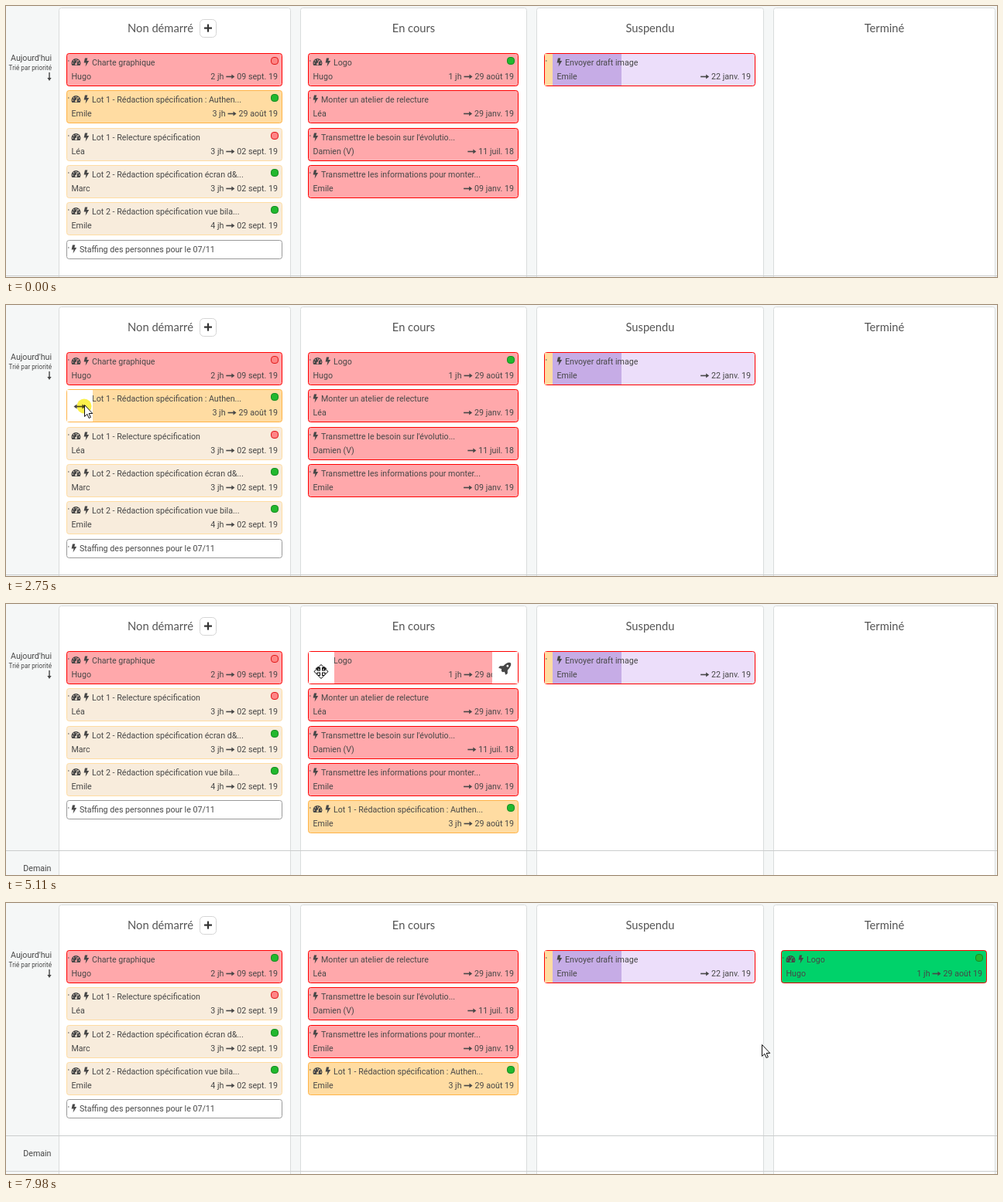
Write an HTML page with a canvas that moves like this. It is 1280 px wide and 351 px high and loops after 8000 ms.

```html
<!DOCTYPE html>
<html lang="fr">
<head>
<meta charset="utf-8">
<title>Kanban</title>
<style>
html, body { margin: 0; width: 100%; height: 100%; overflow: hidden; background: #f5f7f7; }
canvas { display: block; }
</style>
</head>
<body>
<canvas id="stage" width="1280" height="351"></canvas>
<script>
const ctx = document.getElementById('stage').getContext('2d');
const LOOP = 8000, INK = '#474747', BODY = '10.67px Roboto, sans-serif';

const column = (title, x, end) => ({ title, x, end, left: x + 10, right: end - 11, mid: (x + end) / 2 });
const columns = [
  column('Non démarré', 68, 368),
  column('En cours', 380, 673),
  column('Suspendu', 685, 979),
  column('Terminé', 991, 1278)
];
columns[0].mid -= 18.5; // room for the add button

const kinds = {
  red: ['#ffa8ab', '#f00'],
  orange: ['#ffdca2', '#ffb347'],
  beige: ['#f8ecdc', '#ffdca2'],
  white: ['#fff', '#999'],
  purple: ['#ecdefa', '#f00'],
  green: ['#00d26a', '#f00']
};

const card = (kind, title, who, load, date, dot) => ({ kind, title, who, load, date, dot });
const chart = card('red', 'Charte graphique', 'Hugo', '2 jh', '09 sept. 19', 'red');
const chartOk = { ...chart, dot: 'green' };
const spec = card('orange', 'Lot 1 - Rédaction spécification : Authen...', 'Emile', '3 jh', '29 août 19', 'green');
const logo = card('red', 'Logo', 'Hugo', '1 jh', '29 août 19', 'green');
const logoDone = { ...logo, kind: 'green' };
const draft = card('purple', 'Envoyer draft image', 'Emile', '', '22 janv. 19');
const todo = [
  card('beige', 'Lot 1 - Relecture spécification', 'Léa', '3 jh', '02 sept. 19', 'red'),
  card('beige', 'Lot 2 - Rédaction spécification écran d&...', 'Marc', '3 jh', '02 sept. 19', 'green'),
  card('beige', 'Lot 2 - Rédaction spécification vue bila...', 'Emile', '4 jh', '02 sept. 19', 'green'),
  card('white', 'Staffing des personnes pour le 07/11')
];
const doing = [
  card('red', 'Monter un atelier de relecture', 'Léa', '', '29 janv. 19'),
  card('red', "Transmettre le besoin sur l'évolutio...", 'Damien (V)', '', '11 juil. 18'),
  card('red', 'Transmettre les informations pour monter...', 'Emile', '', '09 janv. 19')
];

const phases = [
  { from: 0, line: 349, cols: [[chart, spec, ...todo], [logo, ...doing], [draft], []] },
  { from: 4010, line: 319, cols: [[chart, ...todo], [logo, ...doing, spec], [draft], []] },
  { from: 7610, line: 301, cols: [[chartOk, ...todo], [...doing, spec], [draft], [logoDone]] }
];

const drags = [
  { item: spec, col: 0, row: 1, hover: 2160, press: 2700, start: 2780, release: 3860, drop: 3890, settle: 4010, rest: 4740 },
  { item: logo, col: 1, row: 0, hover: 5110, press: 5940, start: 5940, release: 7490, drop: 7490, settle: 7610, rest: 7640 }
];

// pointer stops: arrival time, x, y, and departure time where it rests
const stops = [
  [500, 970, 346], [1180, 377, 181], [1290, 306, 155], [2110, 101, 130, 2770], [2960, 142, 134],
  [3510, 446, 114, 4660], [4890, 407, 87, 6250], [6930, 977, 83], [7130, 1032, 82, 7510], [7960, 976, 184, LOOP]
].map(([at, x, y, rest]) => ({ at, x, y, rest, leave: rest || at }));

const within = (v, a, b) => v >= a && v < b;
const cardTop = row => Math.round(60.8 + 48.4 * row);

function speed(i, k) {
  const a = stops[i - 1], c = stops[i + 1];
  return !a || !c || stops[i].rest ? 0 : (c[k] - a[k]) / (c.at - a.leave);
}

function pointer(t) {
  const i = Math.max(0, stops.findLastIndex(s => s.at <= t));
  const a = stops[i], b = stops[i + 1];
  if (t <= a.leave || !b) return a;
  const d = b.at - a.leave, u = (t - a.leave) / d, v = 1 - u;
  const at = k => Math.round(v * v * (1 + 2 * u) * a[k] + u * u * (3 - 2 * u) * b[k]
    + d * u * v * (v * speed(i, k) - u * speed(i + 1, k)));
  return { x: at('x'), y: at('y') };
}

function text(str, x, y, align = 'left', font = BODY, color = INK) {
  ctx.font = font;
  ctx.textAlign = align;
  ctx.fillStyle = color;
  ctx.fillText(str, x, y);
}

function rect(x, y, w, h, fill) {
  ctx.fillStyle = fill;
  ctx.fillRect(x, y, w, h);
}

function paint(fill, stroke) {
  if (fill) { ctx.fillStyle = fill; ctx.fill(); }
  if (stroke) { ctx.lineWidth = 1; ctx.strokeStyle = stroke; ctx.stroke(); }
}

function box(x, y, w, h, r, fill, stroke) {
  ctx.beginPath();
  ctx.roundRect(x + .5, y + .5, w - 1, h - 1, r);
  paint(fill, stroke);
}

function poly(x, y, pts, fill, stroke) {
  ctx.beginPath();
  pts.forEach((v, i) => i % 2 || ctx.lineTo(x + v, y + pts[i + 1]));
  ctx.closePath();
  paint(fill, stroke);
}

function disc(x, y, r, fill) {
  ctx.beginPath();
  ctx.arc(x, y, r, 0, 7);
  paint(fill);
}

function bolt(x, y) {
  poly(x, y, [2, 0, 5.3, 0, 4.3, 3.4, 7.2, 3.4, 2.6, 11, 3.4, 6, .6, 6], INK);
}

function gauge(x, y, back) {
  ctx.beginPath();
  ctx.arc(x, y, 6, Math.PI * .83, Math.PI * 2.17);
  paint(INK);
  for (let i = 0; i < 5; i++) {
    const a = Math.PI * (1 + i / 4);
    disc(x + 4.2 * Math.cos(a), y + 4.2 * Math.sin(a), .75, back);
  }
  ctx.beginPath();
  ctx.moveTo(x, y + 1);
  ctx.lineTo(x + 2, y - 3.8);
  paint(null, back);
  disc(x, y + 1.2, 1.3, back);
}

// horizontal arrow from x to tip, pointing either way
function arrow(x, y, tip) {
  const dir = Math.sign(tip - x);
  poly(tip, y, [0, 0, -4 * dir, -3, -4 * dir, 3], INK);
  ctx.fillRect(x, y - .8, tip - x - 3 * dir, 1.6);
}

function rocket(x, y) {
  ctx.save();
  ctx.translate(x, y);
  ctx.rotate(Math.PI / 4);
  ctx.beginPath();
  ctx.ellipse(0, -1.5, 3.8, 8, 0, 0, 7);
  paint(INK);
  poly(0, 0, [0, -4, 7, 3, 6.5, 6, 0, 3, -6.5, 6, -7, 3], INK);
  disc(0, -4, 1.4, '#fff');
  ctx.restore();
}

function drawCard(item, col, y, hover, faded) {
  const { left, right } = columns[col], [fill, edge] = kinds[item.kind];
  const h = item.date ? 43 : 25, w = right - left;
  let x = left + 6;
  box(left, y, w, h, 3, fill, edge);
  if (item.kind === 'purple') {
    rect(left + 1, y + 1, 10, h - 2, '#ffdca2');
    rect(left + 11, y + 1, 89, h - 2, '#c6ace6');
    x += 10;
  }
  rect(left + 2, y + 9.5, 1.5, 1, INK);
  if (item.date) {
    text(item.who, x + .5, y + 34);
    text(item.date, right - 6, y + 34, 'right');
    const end = right - 6 - ctx.measureText(item.date).width;
    arrow(end - 14, y + 30.5, end - 3);
    if (item.load) text(item.load, end - 17, y + 34, 'right');
  }
  if (item.load) {
    gauge(x + 6.5, y + 13, fill);
    x += 16;
  }
  bolt(x, y + 6.5);
  text(item.title, x + 11, y + 16);
  if (item.dot) {
    const colors = item.dot === 'red' ? ['#ff8585', '#e01818'] : ['#22b82e', '#168c22'];
    box(right - 15, y + 5, 10, 10, 3.5, ...colors);
  }
  if (hover) {
    const mid = y + h / 2;
    rect(left + 1, y + 1, 33, h - 2, '#fff');
    arrow(left + 17, mid + 1, left + 9.5);
    arrow(left + 17, mid + 1, left + 24.5);
    if (col) {
      rect(right - 34, y + 1, 33, h - 2, '#fff');
      rocket(right - 17, mid + .5);
    }
  }
  if (faded) rect(left, y, w, h, 'rgba(255,255,255,.7)');
}

function drawBoard(phase, target) {
  rect(0, 0, 1280, 351, '#f5f7f7');
  for (const c of columns) {
    box(c.x, 2, c.end - c.x, 360, 3, '#fff', '#d9dcdc');
    text(c.title, c.mid, 34, 'center', '14.7px Lato, sans-serif', '#555');
  }
  box(250, 17, 22, 24, 5, '#fff', '#d5d5d5');
  rect(256, 27.5, 10, 2.2, '#333');
  rect(259.9, 23.6, 2.2, 10, '#333');

  text("Aujourd'hui", 59, 71, 'right');
  text('Trié par priorité', 59, 83, 'right', '8.2px Roboto, sans-serif');
  rect(55.3, 86, 1.4, 8, INK);
  poly(56, 97, [-2.6, -4, 2.6, -4, 0, 0], INK);

  for (let y = phase.line; y < 351; y += 46) rect(0, y, 1280, 1, '#cbcdcd');
  text('Demain', 58.5, phase.line + 27, 'right');
  if (target) box(target.x, 2, target.end - target.x, 360, 0, null, '#111');
}

function moveCursor(x, y) {
  ctx.save();
  ctx.translate(x, y);
  for (const color of ['#000', '#fff']) {
    const grow = color === '#000' ? 1 : 0;
    for (let k = 0; k < 4; k++) {
      rect(-1 - grow, -7, 2 + 2 * grow, 7, color);
      poly(0, -8.5 - grow, [0, 0, 3 + 2 * grow, 3 + 2 * grow, -3 - 2 * grow, 3 + 2 * grow], color);
      ctx.rotate(Math.PI / 2);
    }
  }
  ctx.restore();
}

function handCursor(x, y) {
  for (let k = 3; k >= 0; k--) {
    box(x - 2 + 2.5 * k, y + (k ? 5 + k : 0), 4, 13, 1.5, '#fff', '#000');
  }
  poly(x, y, [-1.5, 12, -4, 9.5, -5, 11, -1.5, 17.5, -1, 20.5, 5.5, 20.5, 7.5, 14], '#fff', '#000');
  rect(x - 1, y + 10, 8, 5, '#fff');
}

function drawPointer(t, { x, y }) {
  if (t < 500) return;
  const during = (a, b) => drags.some(d => within(t, d[a], d[b]));
  if (during('press', 'release')) {
    ctx.globalCompositeOperation = 'multiply';
    disc(x, y + 1, 9.5, '#fbf04a');
    ctx.globalCompositeOperation = 'source-over';
  }
  if (during('hover', 'press')) moveCursor(x, y + .5);
  else if (during('release', 'rest')) handCursor(x, y);
  else poly(x + .5, y - .5, [0, 0, 0, 15, 3.4, 11.8, 5.6, 17, 7.9, 16, 5.7, 11, 10.3, 11], '#fff', '#111');
}

function draw(t) {
  const phase = phases.findLast(p => t >= p.from);
  const drag = drags.find(d => within(t, d.start, d.settle));
  const carrying = drag && t < drag.drop;
  const canHover = !drags.some(d => within(t, d.start, d.rest));
  const p = pointer(t);
  const target = carrying && columns.find((c, i) => i !== drag.col && within(p.x, c.x, c.end));

  drawBoard(phase, target);
  phase.cols.forEach((list, col) => list.forEach((item, row) => {
    const y = cardTop(row), c = columns[col];
    const held = Boolean(drag) && item === drag.item;
    const under = canHover && within(p.x, c.left, c.right) && within(p.y, y, y + 43);
    drawCard(item, col, y, held || under, held);
  }));

  if (carrying) {
    // the ghost trails the pointer slightly
    const c = columns[drag.col], grab = pointer(drag.start), g = pointer(t - 7);
    rect(c.left + g.x - grab.x, cardTop(drag.row) + g.y - grab.y, c.right - c.left, 43, 'rgba(112,168,255,.3)');
  }
  drawPointer(t, p);
}

const begin = performance.now();
function tick() {
  draw((performance.now() - begin) % LOOP);
  requestAnimationFrame(tick);
}
tick();
</script>
</body>
</html>
```
